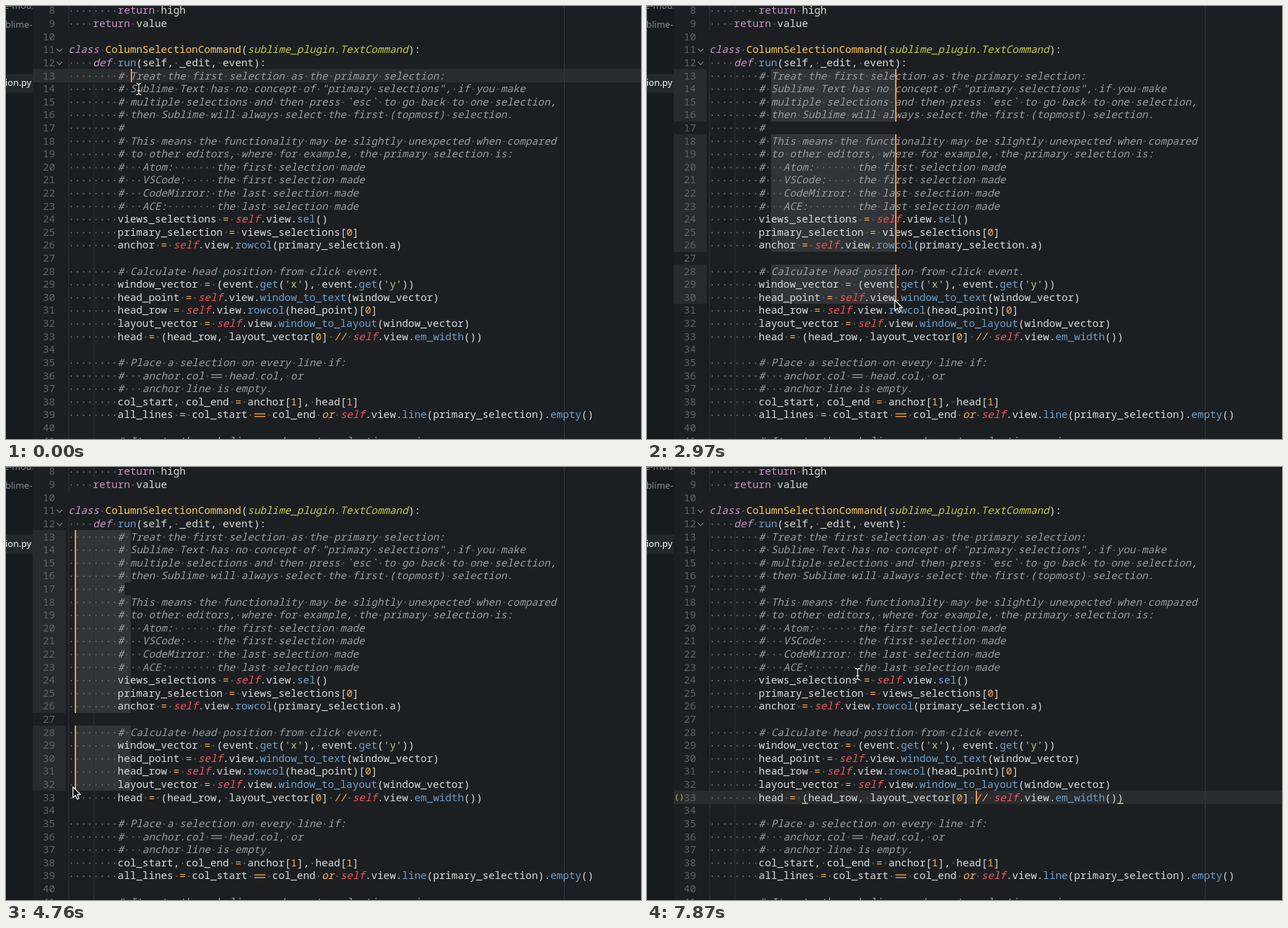
Animation, 906 px wide and 618 px high, one loop 8 s. Source, as an HTML page with a canvas:

```html
<!DOCTYPE html>
<html lang="en">
<head>
<meta charset="utf-8">
<title>Column selection</title>
<style>
html, body { margin: 0; width: 100%; height: 100%; overflow: hidden; background: #1c1f21; }
canvas { display: block; }
</style>
</head>
<body>
<canvas id="stage" width="906" height="618"></canvas>
<script>
const ctx = document.getElementById('stage').getContext('2d');
const LOOP = 8000, STEP = 148.5;
const FIRST = 8, CHAR = 8.82, ROW = 18.61, LEFT = 88.8;
const FONT = '500 14.7px "Noto Sans Mono", monospace';

const color = {
  back: '#1c1f21', side: '#181b1d', sideRow: '#25282a', line: '#2a2c2e', gutter: '#282b2d',
  select: '#323537', guide: '#2a2e30', ruler: '#33373a', number: '#5c6265', dot: '#5c6064',
  plain: '#d8dad9', comment: '#999b9b', keyword: '#c695c6', title: '#fac761', base: '#c3c74d',
  call: '#6d9fcb', self: '#f0525f', operator: '#f9ae58', string: '#a5c77f', caret: '#f29a4c'
};

const code = `        return high
    return value

class ColumnSelectionCommand(sublime_plugin.TextCommand):
    def run(self, _edit, event):
        # Treat the first selection as the primary selection:
        # Sublime Text has no concept of "primary selections", if you make
        # multiple selections and then press \`esc\` to go back to one selection,
        # then Sublime will always select the first (topmost) selection.
        #
        # This means the functionality may be slightly unexpected when compared
        # to other editors, where for example, the primary selection is:
        #   Atom:       the first selection made
        #   VSCode:     the first selection made
        #   CodeMirror: the last selection made
        #   ACE:        the last selection made
        views_selections = self.view.sel()
        primary_selection = views_selections[0]
        anchor = self.view.rowcol(primary_selection.a)

        # Calculate head position from click event.
        window_vector = (event.get('x'), event.get('y'))
        head_point = self.view.window_to_text(window_vector)
        head_row = self.view.rowcol(head_point)[0]
        layout_vector = self.view.window_to_layout(window_vector)
        head = (head_row, layout_vector[0] // self.view.em_width())

        # Place a selection on every line if:
        #   anchor.col == head.col, or
        #   anchor line is empty.
        col_start, col_end = anchor[1], head[1]
        all_lines = col_start == col_end or self.view.line(primary_selection).empty()

        # Iterate through lines and create selection regions`.split('\n');

// Each click sets a column selection; equal columns give bare carets.
const clicks = [
  { at: 0, from: 13, to: 13, anchor: 10, head: 10 },
  { at: 1200, from: 13, to: 23, anchor: 10, head: 17, match: true },
  { at: 2670, from: 13, to: 30, anchor: 10, head: 30 },
  { at: 4750, from: 13, to: 32, anchor: 10, head: 1 },
  { at: 6070, from: 13, to: 32, anchor: 10, head: 10 },
  { at: 7420, from: 33, to: 33, anchor: 43, head: 43, brackets: [15, 66] }
];

// time, x, y
const mousePath = [
  [0, 189, 118], [1040, 236, 295], [1210, 236, 294], [2079, 220, 321], [2230, 222, 325],
  [2670, 353, 419], [3120, 353, 419], [4310, 96, 462], [4600, 95, 456], [4900, 95, 456],
  [5350, 101, 464], [5780, 173, 461], [6530, 173, 461], [6830, 432, 505], [7000, 470, 519],
  [7420, 464, 476], [7573, 464, 476], [7870, 300, 295]
];

const colX = col => LEFT + col * CHAR;
const rowY = row => 90.2 + (row - 13) * ROW;
const textOf = row => code[row - FIRST];

function rect(fill, x, y, w, h) {
  ctx.fillStyle = fill;
  ctx.fillRect(x, y, w, h);
}

function bar(fill, row, x1, x2) {
  const top = Math.round(rowY(row));
  rect(fill, x1, top, x2 - x1, Math.round(rowY(row + 1)) - top);
}

function write(text, col, row, fill, italic) {
  ctx.font = (italic ? 'italic ' : '') + FONT;
  ctx.fillStyle = fill;
  ctx.fillText(text.replace('==', '  '), colX(col), rowY(row) + 14.3);
  const equals = text.indexOf('==');
  if (equals >= 0) {
    for (const dy of [7.4, 11.2]) rect(fill, colX(col + equals) + 1, rowY(row) + dy, 15.6, 1.3);
  }
}

function styleOf(word, line, end) {
  if (/^'/.test(word)) return [color.string];
  if (/^\d/.test(word)) return [color.operator];
  if (/^[=/]/.test(word)) return [color.operator, word === '//'];
  if (word === 'return') return [color.keyword];
  if (/^(class|def)$/.test(word)) return [color.keyword, true];
  if (word === 'or') return [color.operator, true];
  if (word === 'self' && line[end] === '.') return [color.self, true];
  if (word === 'ColumnSelectionCommand') return [color.title];
  if (/^sublime_/.test(word)) return [color.base, true];
  if (/^\w/.test(word) && line[end] === '(') return [color.call];
  return [color.plain];
}

function drawLine(line, row) {
  for (let col = 0; col < line.length; col++) {
    if (line[col] === ' ') rect(color.dot, colX(col) + 3.4, rowY(row) + 9, 2, 2);
  }
  const start = line.search(/\S/);
  if (line[start] === '#') {
    write(line.slice(start), start, row, color.comment, true);
  } else {
    for (const m of line.matchAll(/'\w+'|sublime_plugin\.TextCommand|\w+|==|\/\/|[^\s\w]/g)) {
      write(m[0], m.index, row, ...styleOf(m[0], line, m.index + m[0].length));
    }
  }
}

function drawSidebar() {
  rect(color.side, 0, 0, 38, 618);
  rect(color.sideRow, 0, 97, 38, 27);
  ctx.save();
  ctx.beginPath();
  ctx.rect(0, 0, 38, 618);
  ctx.clip();
  ctx.font = '13px "Noto Sans", sans-serif';
  ctx.fillStyle = '#85898b';
  ctx.fillText('e-mous', -3, 4);
  ctx.fillText('blime-', -1, 31);
  ctx.font = '500 13px "Noto Sans", sans-serif';
  ctx.fillStyle = '#f2f3f3';
  ctx.fillText('ion.py', -1, 113.5);
  ctx.restore();
}

function drawText() {
  rect(color.guide, 89, 0, 1, rowY(10));
  rect(color.guide, 89, rowY(12), 1, 618);
  rect(color.guide, 125, 0, 1, rowY(9));
  rect(color.guide, 125, rowY(13), 1, 618);
  rect(color.ruler, 796, 0, 1, 618);
  code.forEach((line, i) => {
    const row = FIRST + i;
    drawLine(line, row);
    write(String(row).padStart(2), (52.4 - LEFT) / CHAR, row, color.number);
  });
  ctx.strokeStyle = '#777c7e';
  ctx.lineWidth = 1.2;
  for (const row of [11, 12]) {
    const y = rowY(row) + 8;
    ctx.beginPath();
    ctx.moveTo(72.5, y);
    ctx.lineTo(76.5, y + 4);
    ctx.lineTo(80.5, y);
    ctx.stroke();
  }
}

// Rows the selection touches, with clamped column range and caret column.
function regions({ from, to, anchor, head }) {
  const list = [], low = Math.min(anchor, head), high = Math.max(anchor, head);
  for (let row = from; row <= to; row++) {
    const length = textOf(row).length;
    if (low === high || length > low) {
      list.push({ row, start: Math.min(low, length), end: Math.min(high, length), caret: Math.min(head, length) });
    }
  }
  return list;
}

function caretAlpha(age) {
  const phase = age % 1030;
  if (phase < 690) return 1;
  if (phase < 960) return Math.max(0, 1 - (phase - 690) / 100);
  return (phase - 960) / 70;
}

function mouseAt(t) {
  const i = mousePath.findIndex(key => key[0] > t);
  if (i < 0) return mousePath.at(-1).slice(1);
  const [t0, x0, y0] = mousePath[i - 1], [t1, x1, y1] = mousePath[i];
  const k = (t - t0) / (t1 - t0);
  return [x0 + (x1 - x0) * k, y0 + (y1 - y0) * k];
}

function drawMouse(t) {
  const [x, y] = mouseAt(t);
  const arrow = t > 2800 && t < 5400;
  const shape = new Path2D(arrow
    ? 'M0 0V15.5L3.6 12.2L6 17.6L8.6 16.5L6.3 11.2H11Z'
    : 'M-3.5 -8Q0 -8 0 -5.5Q0 -8 3.5 -8M0 -6V6M-3.5 8Q0 8 0 5.5Q0 8 3.5 8M-2 2.5H2');
  ctx.save();
  ctx.translate(Math.round(x) + 0.5, Math.round(y) + 0.5);
  ctx.lineJoin = 'round';
  if (arrow) {
    ctx.fillStyle = '#101213';
    ctx.fill(shape);
  } else {
    ctx.strokeStyle = '#0c0e0f';
    ctx.lineWidth = 3;
    ctx.stroke(shape);
  }
  ctx.strokeStyle = '#f0f0f0';
  ctx.lineWidth = 1.3;
  ctx.stroke(shape);
  ctx.restore();
}

function draw(time) {
  const t = Math.floor((time + 3) / STEP) * STEP;
  const state = clicks.findLast(click => click.at <= t);
  const selected = regions(state), bare = state.anchor === state.head;

  rect(color.back, 0, 0, 906, 618);
  drawSidebar();
  for (const { row, start, end } of selected) {
    if (bare) {
      bar(color.line, row, 38, 906);
    } else {
      bar(color.gutter, row, 38, 85);
      bar(color.select, row, colX(start), colX(end) + 1);
    }
  }
  drawText();

  if (state.match) {
    ctx.strokeStyle = '#85898a';
    ctx.lineWidth = 1;
    ctx.strokeRect(239.5, Math.round(rowY(16)) + 0.5, 45, 18);
  }
  if (state.brackets) {
    for (const col of state.brackets) rect(color.base, colX(col), rowY(33) + 17, CHAR, 1.5);
    ctx.font = FONT.replace('14.7', '11.5');
    ctx.fillText('()', 39, rowY(33) + 13);
  }

  ctx.globalAlpha = caretAlpha(t - state.at);
  for (const { row, caret } of selected) {
    const x = Math.round(colX(caret) + 0.5);
    bar(color.caret, row, x, x + 2);
  }
  ctx.globalAlpha = 1;
  drawMouse(t);
}

function frame() {
  draw(performance.now() % LOOP);
  requestAnimationFrame(frame);
}
frame();
</script>
</body>
</html>
```
